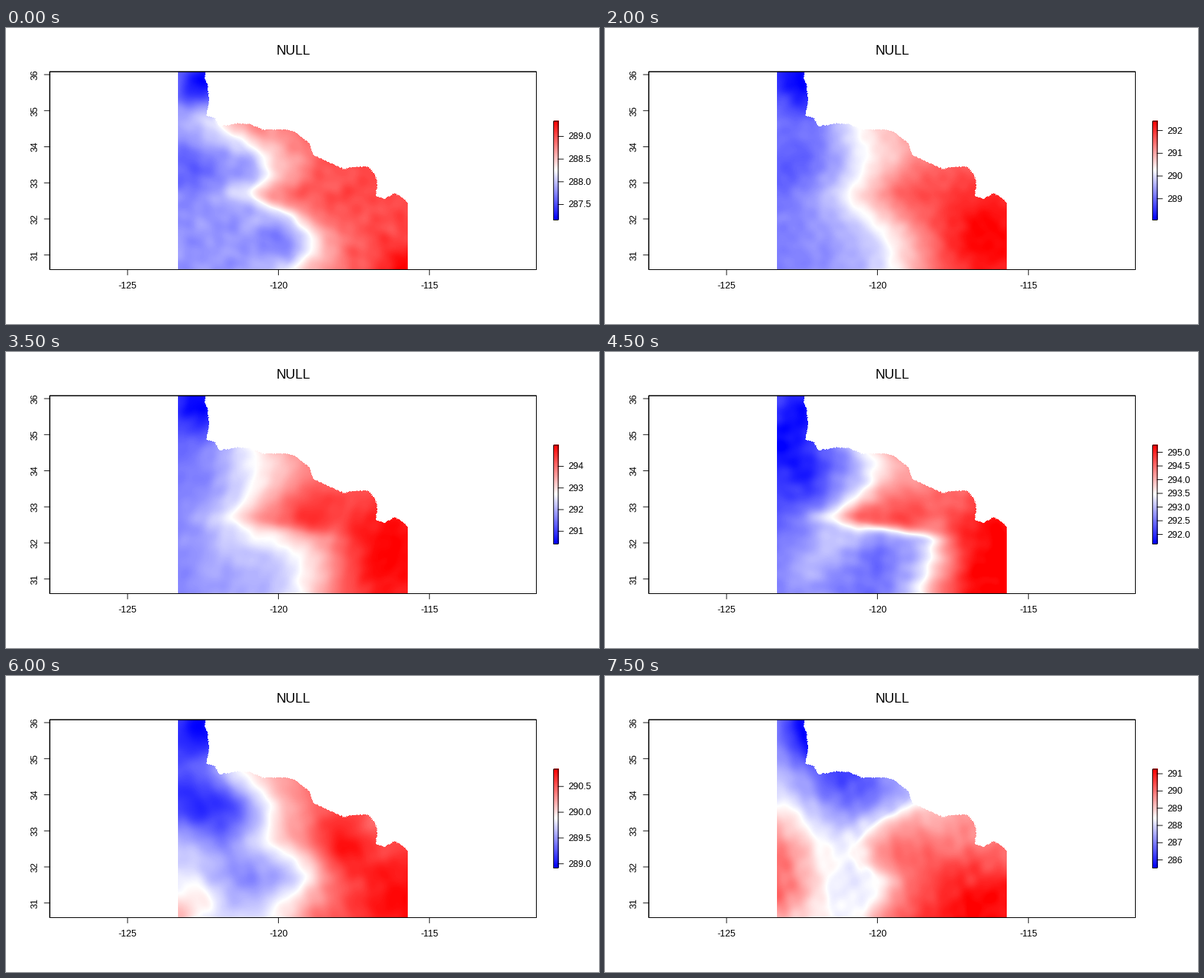
These frames come from a looping animation (800 by 400 pixels, 8 s). A matplotlib script:

```python
import numpy as np
import matplotlib.pyplot as plt
from matplotlib.animation import FuncAnimation
from matplotlib.colors import LinearSegmentedColormap
from matplotlib.path import Path
from matplotlib.patches import Rectangle

W, H, FRAMES, STEP = 800, 400, 16, 500
X0, X1, Y0, Y1 = 232, 542, 59, 327
BAR_L, BAR_R, BAR_T, BAR_B = 738.7, 745, 126, 259.5
PX = 0.72  # points per pixel at 100 dpi

plt.rcParams["font.family"] = "Liberation Sans"
rng = np.random.default_rng(7)
cmap = LinearSegmentedColormap.from_list("sst", ["blue", "white", "red"])
rows = np.arange(Y0, Y1) + 0.5
gx, gy = np.meshgrid(np.arange(X0, X1) + 0.5, rows)

COAST = [
    (270, 56), (268, 68), (272, 77), (274, 98), (270, 118), (282, 122),
    (288, 133), (312, 129), (330, 130), (346, 137), (378, 137), (389, 140),
    (410, 156), (414, 171), (434, 181), (457, 191), (464, 188), (488, 187),
    (497, 197), (501, 208), (499, 227), (511, 231), (524, 223), (532, 227),
    (545, 239)]


def sea_mask():
    """Sea cells: everything south-west of a slightly ragged coast."""
    outline = Path(COAST + [(X1 + 3, Y1 + 3), (X0 - 3, Y1 + 3), (X0 - 3, 56)])
    pts = np.column_stack([gx.ravel(), gy.ravel()])
    pts += rng.uniform(-0.6, 0.6, pts.shape)
    return outline.contains_points(pts).reshape(gx.shape)


def mottle(amp=0.012, waves=30):
    """Soft cloudy texture made of random waves."""
    total = np.zeros(gx.shape)
    for _ in range(waves):
        k = 2 * np.pi / rng.uniform(18, 60)
        a, phase = rng.uniform(0, 2 * np.pi, 2)
        total += np.cos(k * (gx * np.cos(a) + gy * np.sin(a)) + phase)
    return amp * total / np.sqrt(waves / 2)


def blob(x, y, r, amp):
    return amp * np.exp(-((gx - x) ** 2 + (gy - y) ** 2) / (2 * r * r))


def front_line(xs, pad=7):
    """Smooth x of the front per row, from evenly spaced knots."""
    x = np.interp(rows, np.linspace(125, 325, len(xs)), xs)
    box = np.ones(2 * pad + 1) / (2 * pad + 1)
    return np.convolve(np.pad(x, pad, mode="edge"), box, "valid")[:, None]


fields, ranges = {}, {}


def key(i, lo, hi, front, cold, warm, width, north, *blobs):
    """A cold and a warm plateau split by a front, plus local anomalies."""
    d = gx - front_line(front)
    z = 0.5 + np.where(d < 0, cold, warm) * np.tanh(d / width)
    z += blob(275, 72, 30, north) + mottle()
    z += sum(blob(*b) for b in blobs)
    ranges[i] = lo, hi
    fields[i] = np.clip(z, 0, 1)


key(0, 287.157, 289.334, [275, 308, 331, 342, 318, 372, 397, 396, 372],
    0.18, 0.36, 45, -0.43,
    (250, 185, 28, -0.12), (325, 190, 16, -0.08), (376, 290, 22, -0.12),
    (262, 135, 22, 0.08), (370, 165, 35, -0.12), (425, 318, 30, -0.1),
    (540, 325, 25, 0.13))

key(2, 286.56, 289.845, [350, 353, 368, 366, 347, 370, 394, 402, 407],
    0.28, 0.25, 60, -0.25,
    (285, 160, 40, -0.2), (242, 205, 30, -0.12),
    (405, 160, 28, -0.12), (515, 295, 55, 0.25))

key(6, 289.79, 294.83, [303, 306, 314, 312, 302, 322, 346, 354, 355],
    0.25, 0.36, 80, -0.36,
    (240, 65, 25, -0.12), (410, 215, 25, 0.13), (385, 300, 35, -0.1),
    (375, 150, 30, -0.09), (510, 270, 45, 0.16))

key(9, 291.65, 295.257, [345, 360, 352, 338, 316, 424, 440, 437, 425],
    0.33, 0.45, 50, -0.15,
    (238, 125, 28, -0.14), (275, 178, 30, -0.1), (270, 305, 40, 0.14),
    (305, 250, 30, 0.15), (340, 238, 18, 0.12), (410, 160, 35, -0.15),
    (475, 190, 35, -0.14), (440, 245, 20, -0.15), (520, 290, 50, 0.1))

key(11, 289.615, 291.327, [268, 300, 335, 338, 350, 393, 401, 397, 383],
    0.33, 0.46, 55, -0.3,
    (255, 180, 36, -0.18), (232, 325, 18, 0.35), (268, 300, 20, 0.15),
    (350, 150, 40, -0.1), (415, 230, 28, -0.14), (500, 205, 30, -0.07))

key(13, 288.22, 290.34, [360, 358, 362, 350, 319, 335, 380, 330, 290],
    0.25, 0.2, 70, -0.3,
    (235, 285, 50, 0.54), (235, 215, 25, 0.18), (305, 190, 30, -0.13),
    (448, 228, 32, 0.33), (532, 300, 45, 0.25), (490, 195, 35, -0.07),
    (400, 260, 30, -0.1), (400, 320, 30, 0.08))

key(15, 285.53, 291.26, [430, 425, 398, 355, 336, 342, 370, 365, 343],
    0.12, 0.38, 50, -0.37,
    (330, 135, 42, -0.24), (225, 290, 48, 0.38), (228, 215, 38, 0.2),
    (460, 185, 45, -0.2), (530, 235, 30, -0.1), (510, 310, 50, 0.12))

# Scale limits that leave the straight path between neighbours.
ranges[3] = 287.2, 291.2
ranges[14] = 287.1, 290.8

sea = sea_mask()
stops, range_stops = sorted(fields), sorted(ranges)


def sst(i):
    a = max(s for s in stops if s <= i)
    b = min(s for s in stops if s >= i)
    t = (i - a) / max(b - a, 1)
    z = (1 - t) * fields[a] + t * fields[b]
    low, high = z[sea].min(), z[sea].max()
    return np.ma.masked_array((z - low) / (high - low), ~sea)


def limits(i):
    return [np.interp(i, range_stops, [ranges[s][j] for s in range_stops])
            for j in (0, 1)]


def tick_step(span):
    cell = span / 5
    if cell > 1.556:
        return 2
    if cell > 0.778:
        return 1
    return 0.5 if cell > 0.311 else 0.2


fig = plt.figure(figsize=(W / 100, H / 100), dpi=100, facecolor="white")
ax = fig.add_axes([0, 0, 1, 1])
ax.axis("off")


def line(xs, ys):
    return ax.plot(xs, ys, color="black", lw=0.9 * PX, snap=False, zorder=4)[0]


def label(x, y, s, size=12.5, **kw):
    return ax.text(x, y, s, fontsize=size * PX, va="baseline",
                   rotation_mode="anchor", **kw)


def frame(x0, y0, x1, y1, strokes=1):
    for _ in range(strokes):
        ax.add_patch(Rectangle((x0, y0), x1 - x0, y1 - y0, fill=False,
                               ec="black", lw=PX, snap=False, zorder=3))


def raster(data, extent):
    return ax.imshow(data, cmap=cmap, vmin=0, vmax=1, aspect="auto",
                     extent=extent, interpolation="nearest")


sea_map = raster(sst(0), (X0, X1, Y1, Y0))
raster(np.linspace(1, 0, 134)[:, None], (BAR_L, BAR_R, BAR_B, BAR_T))
ax.set(xlim=(0, W), ylim=(H, 0))

frame(59.04, 59.04, 715.5, 326.5, strokes=2)
frame(BAR_L, BAR_T, BAR_R, BAR_B)
label(387.2, 36, "NULL", 18, ha="center")

for k, lon in enumerate((-125, -120, -115)):
    x = 164 + 203.6 * k
    line([x, x], [326.5, 333.7])
    label(x, 352, str(lon), ha="center")
for lat in range(31, 37):
    y = 63 + 48.75 * (36 - lat)
    line([51.8, 59], [y, y])
    label(42.5, y, str(lat), ha="center", rotation=90)

ticks = [(line([BAR_R, 752], [0, 0]), label(758.5, 0, "")) for _ in range(10)]


def update(i):
    sea_map.set_data(sst(i))
    lo, hi = limits(i)
    step = tick_step(hi - lo)
    values = np.arange(np.ceil(lo / step), np.floor(hi / step) + 1) * step
    for k, (mark, text) in enumerate(ticks):
        shown = k < len(values)
        mark.set_visible(shown)
        text.set_visible(shown)
        if shown:
            v = values[k]
            y = BAR_B - (v - lo) / (hi - lo) * (BAR_B - BAR_T)
            mark.set_ydata([y, y])
            text.set_y(y + 4)
            text.set_text(f"{v:.0f}" if step >= 1 else f"{v:.1f}")
    return [sea_map]


anim = FuncAnimation(fig, update, frames=FRAMES, interval=STEP, repeat=True)
plt.show()
```
